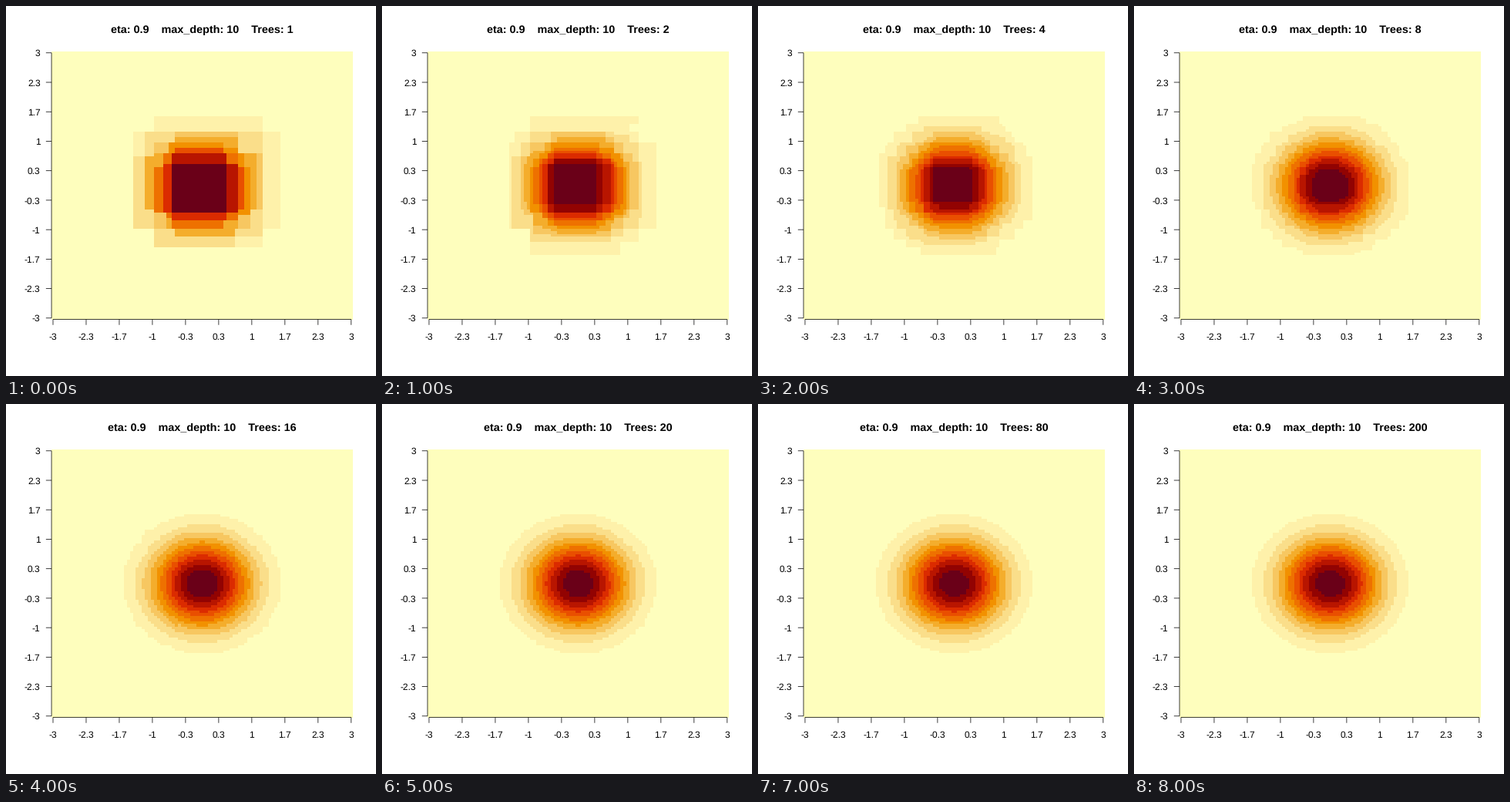
Write a matplotlib script that moves like this. It is 480x480 px and loops after 9 s.

```python
import numpy as np
import matplotlib.pyplot as plt
from matplotlib.animation import FuncAnimation

SIZE, DPI = 480, 100
PX = 72 / DPI                                   # points per pixel
LEFT, RIGHT, TOP, BOTTOM = 59.04, 449.76, 59.04, 406.56

N = 100
RATE, MAX_DEPTH, LAMBDA, BASE = 0.3, 10, 1.0, 0.5
COUNTS = [1, 2, 4, 8, 16, 20, 40, 80, 200]
MAX_ROUNDS = 60                                 # converged by then

plt.rcParams["font.family"] = "Liberation Sans"
plt.rcParams["text.hinting"] = "none"


def palette(n):
    """Sequential yellow-orange-red ramp in polar LUV space."""
    i = np.linspace(0, 1, n)
    hue = np.radians(85 - 80 * i)
    lum = 99 - 74 * i ** 1.3
    t, peak = i ** 1.6, 1 / (1 + 105 / 140)
    chroma = np.where(t <= peak, 40 + 140 * t / peak,
                      180 - 105 * (t - peak) / (1 - peak))
    u = chroma * np.cos(hue) / (13 * lum) + 0.1978
    v = chroma * np.sin(hue) / (13 * lum) + 0.4683
    y = ((lum + 16) / 116) ** 3
    x = y * 9 * u / (4 * v)
    z = y * (12 - 3 * u - 20 * v) / (4 * v)
    to_rgb = np.array([[3.2406, -1.5372, -0.4986],
                       [-0.9689, 1.8758, 0.0415],
                       [0.0557, -0.2040, 1.0570]])
    lin = np.clip(to_rgb @ np.array([x, y, z]), 0, 1).T
    rgb = np.where(lin < 0.00304, 12.92 * lin, 1.055 * lin ** (1 / 2.4) - 0.055)
    return np.clip(rgb, 0, 1) ** 1.22           # display gamma


def best_cut(sums, width):
    """Best split score along one axis; ties go to the larger threshold."""
    m = len(sums)
    if m < 2:
        return -1.0, 0
    acc = np.cumsum(sums)
    low, total = acc[:-1], acc[-1]
    k = np.arange(1, m)
    n = k * width
    gain = (low ** 2 / (n + LAMBDA)
            + (total - low) ** 2 / (m * width - n + LAMBDA)
            - total ** 2 / (m * width + LAMBDA))
    j = int(np.argmax(gain * (1 + 1e-9 * k)))
    return gain[j], j + 1


def add_tree(resid):
    """Grow one greedy tree on the residual grid and subtract its leaves."""
    stack = [(0, N, 0, N, 0)]
    while stack:
        y0, y1, x0, x1, depth = stack.pop()
        part = resid[y0:y1, x0:x1]
        cols = part.sum(axis=0)
        if depth < MAX_DEPTH:
            gx, cx = best_cut(cols, y1 - y0)
            gy, cy = best_cut(part.sum(axis=1), x1 - x0)
            if max(gx, gy) > 1e-6:
                depth += 1
                if gy > gx * (1 + 1e-6):
                    stack.append((y0, y0 + cy, x0, x1, depth))
                    stack.append((y0 + cy, y1, x0, x1, depth))
                else:
                    stack.append((y0, y1, x0, x0 + cx, depth))
                    stack.append((y0, y1, x0 + cx, x1, depth))
                continue
        part -= RATE * cols.sum() / (part.size + LAMBDA)


def boosted_surfaces():
    axis = np.linspace(-3, 3, N)
    bell = np.exp(-axis ** 2)
    target = np.outer(bell, bell)
    resid = target - BASE
    wanted = [min(c, MAX_ROUNDS) for c in COUNTS]
    fits = {}
    for trees in range(1, max(wanted) + 1):
        add_tree(resid)
        if trees in wanted:
            fits[trees] = target - resid
    return [fits[w] for w in wanted]


COLORS = palette(12)


def paint(z):
    level = (z - z.min()) / (z.max() - z.min()) * len(COLORS)
    return COLORS[np.clip(level.astype(int), 0, len(COLORS) - 1)]


images = [paint(z) for z in boosted_surfaces()]

fig = plt.figure(figsize=(SIZE / DPI, SIZE / DPI), dpi=DPI, facecolor="white")
ax = fig.add_axes([0, 0, 1, 1])
heat = ax.imshow(images[0], extent=(LEFT, RIGHT, BOTTOM, TOP), origin="lower",
                 interpolation="nearest", aspect="auto")
ax.set_xlim(0, SIZE)
ax.set_ylim(SIZE, 0)
ax.axis("off")


def line(xs, ys):
    ax.plot(xs, ys, color="black", lw=0.75 * PX, solid_capstyle="butt",
            snap=False)


half_w, half_h = (RIGHT - LEFT) / N / 2, (BOTTOM - TOP) / N / 2
tick_x = np.linspace(LEFT + half_w, RIGHT - half_w, 10)
tick_y = np.linspace(BOTTOM - half_h, TOP + half_h, 10)

line([tick_x[0], tick_x[-1]], [BOTTOM, BOTTOM])
line([LEFT, LEFT], [tick_y[0], tick_y[-1]])
for value, tx, ty in zip(np.linspace(-3, 3, 10), tick_x, tick_y):
    label = f"{round(value, 1):g}"
    line([tx, tx], [BOTTOM, BOTTOM + 7.2])
    line([LEFT, LEFT - 7.2], [ty, ty])
    ax.text(tx, 433, label, size=12 * PX, ha="center", va="baseline")
    ax.text(44.6, ty + 4.5, label, size=12 * PX, ha="right", va="baseline")

title = ax.text((LEFT + RIGHT) / 2, 35, "", size=14.4 * PX, weight="bold",
                ha="center", va="baseline")


def update(i):
    heat.set_data(images[i])
    title.set_text(f"eta: 0.9    max_depth: {MAX_DEPTH}    Trees: {COUNTS[i]}")
    return heat, title


anim = FuncAnimation(fig, update, frames=len(COUNTS), interval=1000,
                     repeat=True, repeat_delay=0)
plt.show()
```
